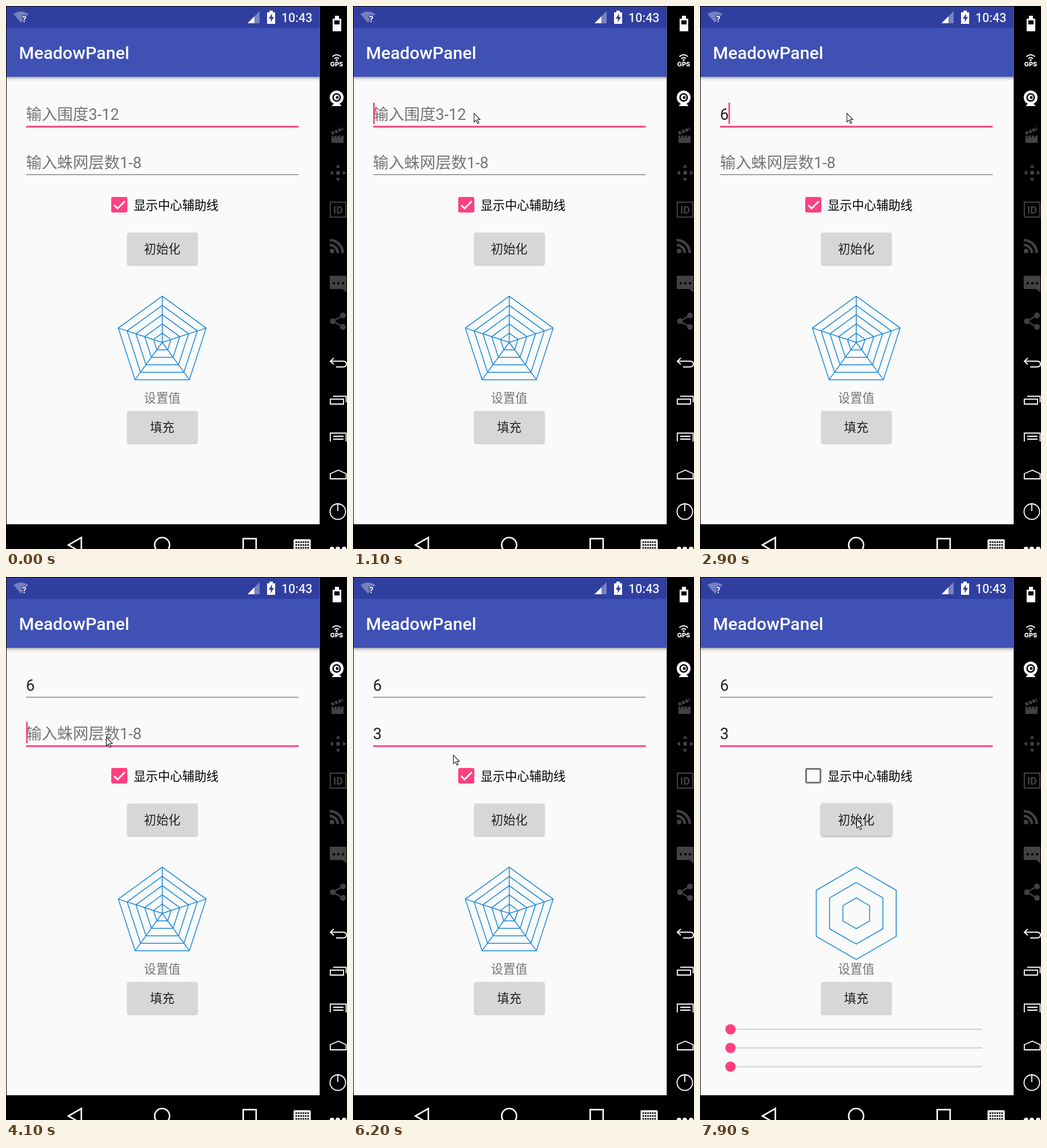
Animation of 593 by 944 pixels, one loop 8 s. Source, as an HTML page:

```html
<!DOCTYPE html>
<html lang="zh-CN">
<head>
<meta charset="utf-8">
<style>
  html, body { margin: 0; width: 100%; height: 100%; overflow: hidden; background: #000; }
  svg { display: block; width: 593px; height: 944px; }
  text { font-family: Roboto, "Noto Sans CJK SC", "Noto Sans CJK", sans-serif; }
  .big { font-size: 27.2px; }
  .mid { font-size: 21.1px; }
  .hint { fill: #757575; }
  .ink { fill: #212121; }
  .center { text-anchor: middle; }
  .button { fill: #d6d7d7; filter: drop-shadow(0 1.3px 1px rgba(0,0,0,.28)); }
  .button.raised { filter: drop-shadow(0 1.8px 2.2px rgba(0,0,0,.42)); }
  .web { fill: none; stroke: #1b87db; stroke-width: 1.5; }
  .line { fill: none; stroke: #fff; stroke-width: 2; }
  .pink { fill: #ff4081; }
</style>
</head>
<body>
<svg viewBox="0 0 593 944">
  <defs>
    <linearGradient id="shade" x2="0" y2="1">
      <stop offset="0" stop-opacity=".34"/>
      <stop offset=".45" stop-opacity=".1"/>
      <stop offset="1" stop-opacity="0"/>
    </linearGradient>
  </defs>
  <rect width="593" height="944"/>

  <!-- app screen -->
  <rect x="1" y="1" width="544.5" height="900" fill="#fafafa"/>
  <rect x="1" y="123" width="544.5" height="8" fill="url(#shade)"/>
  <rect x="1" y="1" width="544.5" height="37" fill="#303f9f"/>
  <rect x="1" y="38" width="544.5" height="85" fill="#3f51b5"/>
  <text x="22.5" y="92" font-size="30.2" font-weight="500" fill="#fff">MeadowPanel</text>

  <!-- status bar -->
  <path d="M13 14Q26 5 39 14L26 29Z" fill="#7680bf"/>
  <text x="28" y="28" font-size="15" font-weight="700" fill="#fff" stroke="#303f9f" stroke-width="3" paint-order="stroke">?</text>
  <path d="M420 30L441 9V30Z" fill="#7883c1"/>
  <path d="M420 30L432 18V30Z" fill="#fff"/>
  <path d="M458 8h6v3h4v20h-14v-20h4z" fill="#fff"/>
  <path d="M462.5 13L457 22h3.5v6l5.500-9h-3.500z" fill="#303f9f"/>
  <text x="479" y="27.500" font-size="21.2" font-weight="500" fill="#eef0f8">10:43</text>

  <!-- form -->
  <g id="rows"></g>
  <rect id="caret" class="pink" width="2.7" height="37"/>
  <g id="checked">
    <rect class="pink" x="183" y="332" width="28" height="27" rx="3"/>
    <path d="M188 346l6 6 12.500-12.500" class="line" stroke-width="3" style="stroke-width:3"/>
  </g>
  <rect id="unchecked" x="184.500" y="333.500" width="25" height="24" rx="2" fill="none" stroke="#757575" stroke-width="3"/>
  <text class="mid" x="222" y="353.500">显示中心辅助线</text>
  <rect id="init" class="button" x="211" y="394" width="122" height="56" rx="3"/>
  <text class="mid ink center" x="271.700" y="430">初始化</text>
  <g id="penta" class="web"></g>
  <g id="hexa" class="web"></g>
  <text class="mid hint center" x="271.700" y="688.500">设置值</text>
  <rect class="button" x="211" y="704" width="122" height="56" rx="3"/>
  <text class="mid ink center" x="271.700" y="739.500">填充</text>
  <g id="sliders"></g>

  <!-- navigation bar -->
  <g class="line" style="stroke-width:2.6">
    <path d="M131 924V950L108.500 937Z"/>
    <circle cx="271.500" cy="937" r="13"/>
    <rect x="412.500" y="926" width="22.500" height="24"/>
  </g>
  <rect x="500" y="927" width="30" height="20" rx="2" fill="#eee"/>
  <path d="M503.500 932H527M503.500 937H527M503.500 942H527" stroke="#000" stroke-width="2.600" stroke-dasharray="2.700 1.400"/>
  <g fill="#fff"><circle cx="567" cy="944" r="4"/><circle cx="577" cy="944" r="4"/><circle cx="588" cy="944" r="4"/></g>

  <!-- side tools -->
  <g fill="#fff">
    <path d="M572 17h7v5h4v22h-15v-22h4zM571 25v7h9v-7z" fill-rule="evenodd"/>
    <circle cx="575" cy="94" r="1.800"/>
    <path class="line" d="M571 91.500q4-3.500 8 0M567.500 88q7.500-6.500 15 0"/>
    <text class="center" x="575" y="105" font-size="11" font-weight="800" style="font-family:Inter,sans-serif">GPS</text>
    <circle cx="575" cy="159" r="12"/>
    <path d="M567 174q0-3 4-4h8q4 1 4 4z"/>
    <circle cx="575" cy="159" r="7.500" fill="#000"/>
    <circle cx="575" cy="159" r="5"/>
    <circle cx="576" cy="159" r="2.500" fill="#000"/>
  </g>
  <g fill="#424242" stroke="#424242" stroke-width="0">
    <path d="M566 225h21v13h-21zM565 219l20-8 2 5-20 8z"/>
    <path d="M570 217l3 5M576 214.500l3 5M582 212l3 5M566 224.500h21M571 225l-2 4M577 225l-2 4M583 225l-2 4" stroke="#000" stroke-width="1.500"/>
    <circle cx="577.500" cy="290" r="3.500"/>
    <path d="M577.500 275l4 6h-8zM577.500 305l4-6h-8zM563 290l6-4v8zM592 290l-6-4v8z"/>
    <rect x="564" y="341" width="27" height="26" fill="none" stroke-width="2"/>
    <text class="center" x="577.500" y="360.500" font-size="18" font-weight="700">ID</text>
    <circle cx="567" cy="426" r="4"/>
    <path d="M563 415.500a14 14 0 0 1 14 14M563 407a22.500 22.500 0 0 1 22.500 22.500" fill="none" stroke-width="4.500"/>
    <path d="M563 469h29v29l-7-6h-22z"/>
    <g fill="#000"><circle cx="570" cy="482" r="2.200"/><circle cx="578" cy="482" r="2.200"/><circle cx="586" cy="482" r="2.200"/></g>
    <circle cx="568.500" cy="548" r="5"/><circle cx="586" cy="538" r="5"/><circle cx="586" cy="558" r="5"/>
    <path d="M586 538L568.500 548L586 558" fill="none" stroke-width="2.500"/>
  </g>
  <g class="line" style="stroke-width:1.800">
    <path d="M570 612l-6 5.500 6 5.500M564 617.500H586q6 0 6 5t-6 5H574"/>
    <path d="M564 683.500h23v8.500h-23zM569 678.500H591.500V689"/>
    <path d="M564 757V742.500H591.500V757M569 748H587M569 753H587"/>
    <path d="M564 822V813L578 807L591.500 813V822Z"/>
    <circle cx="577" cy="879" r="13.500"/><path d="M577 864V878"/>
  </g>

  <path id="mouse" d="M.5 .5V15.500L4 12.300L6.700 18.300L9 17.300L6.400 11.500H11Z" fill="#fff" stroke="#222" stroke-width="1.100"/>
</svg>
<script>
const $ = id => document.getElementById(id);
const LOOP = 8000, TICK = 100;

// [time, x, y] of the pointer tip
const path = [
  [100, 578, 2], [700, 210, 186], [1100, 210, 186], [1200, 210, 187], [1300, 210, 187],
  [1400, 209, 190], [1800, 209, 190], [2100, 268, 186], [2200, 268, 186], [2600, 255, 186],
  [3000, 255, 186], [3900, 174, 278], [5800, 174, 278], [6200, 174, 309], [6500, 196, 347],
  [6700, 196, 347], [6800, 199, 352], [7200, 199, 352], [7600, 272, 421]
];
// [on, off, x, y] of the text caret
const blinks = [
  [100, 600, 35, 168], [1100, 1600, 35, 168], [2100, 2600, 35, 168],
  [2900, 3400, 49.5, 168], [3900, 4100, 49.5, 168],
  [4100, 4500, 35, 252], [5000, 5400, 35, 252],
  [5400, 5900, 49.5, 252], [6400, 6900, 49.5, 252], [7400, 7900, 49.5, 252]
];
const fields = [
  { hint: '输入围度3-12', value: '6', typed: 2900, y: 197.5, focus: t => t < 4100 },
  { hint: '输入蛛网层数1-8', value: '3', typed: 5400, y: 281.5, focus: t => t >= 4100 }
];

$('rows').innerHTML = fields.map((f, i) =>
  `<text id="text${i}" class="big" x="34.7" y="${f.y}"></text><rect id="rule${i}" x="35" width="474"/>`).join('');

function web(sides, layers, spokes) {
  const cx = 271.7, cy = 584.7, R = 80.3;
  const ring = r => Array.from({ length: sides }, (_, i) => {
    const a = i * 2 * Math.PI / sides;
    return [cx + r * Math.sin(a), cy - r * Math.cos(a)];
  });
  let d = '';
  for (let k = 1; k <= layers; k++) d += 'M' + ring(R * k / layers).join('L') + 'Z';
  if (spokes) for (const p of ring(R)) d += `M${cx} ${cy}L${p}`;
  return `<path d="${d}"/>`;
}
$('penta').innerHTML = web(5, 5, true);
$('hexa').innerHTML = web(6, 3, false);
$('sliders').innerHTML = [786.3, 818.7, 851.2].map(y =>
  `<path d="M53 ${y}H491" stroke="#d9d9d9" stroke-width="2.8"/><circle class="pink" cx="53" cy="${y}" r="9"/>`).join('');

const show = (id, on) => { $(id).style.display = on ? '' : 'none'; };

function pointer(t) {
  const i = path.findIndex(p => p[0] > t);
  if (i < 0) return path[path.length - 1].slice(1);
  const [a, b] = [path[i - 1], path[i]];
  const k = (t - a[0]) / (b[0] - a[0]);
  return [1, 2].map(n => Math.round(a[n] + (b[n] - a[n]) * k));
}

function draw(time) {
  const t = Math.floor(time % LOOP / TICK) * TICK;

  fields.forEach((f, i) => {
    const typed = t >= f.typed, focus = f.focus(t);
    const text = $('text' + i), rule = $('rule' + i);
    text.textContent = typed ? f.value : f.hint;
    text.setAttribute('class', 'big ' + (typed ? 'ink' : 'hint'));
    rule.setAttribute('y', (i ? 292.5 : 208.3));
    rule.setAttribute('height', focus ? 3 : 1.4);
    rule.setAttribute('fill', focus ? '#ff4081' : '#808080');
  });

  const blink = blinks.find(b => t >= b[0] && t < b[1]);
  show('caret', blink);
  if (blink) {
    $('caret').setAttribute('x', blink[2]);
    $('caret').setAttribute('y', blink[3]);
  }

  show('mouse', t >= 100);
  if (t >= 100) $('mouse').setAttribute('transform', `translate(${pointer(t)})`);

  show('checked', t < 7000);
  show('unchecked', t >= 7000);
  $('init').classList.toggle('raised', t >= 7700);
  show('penta', t < 7800);
  show('hexa', t >= 7800);
  show('sliders', t >= 7800);
}

const start = performance.now();
function loop() {
  draw(performance.now() - start);
  requestAnimationFrame(loop);
}
loop();
</script>
</body>
</html>
```
